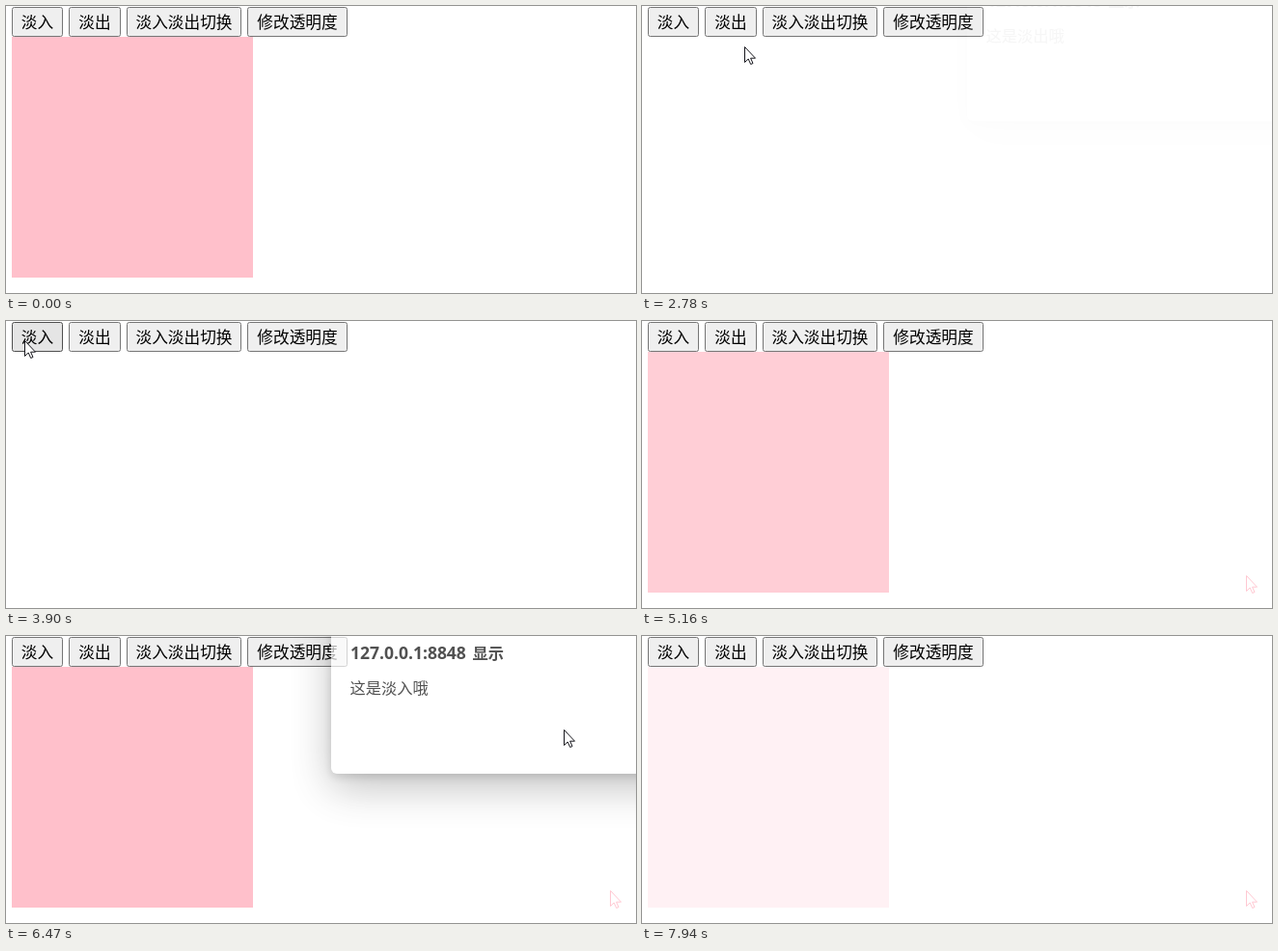
Animation, 653 px wide and 298 px high, one loop 8000 ms. Source, as an HTML page:

```html
<!DOCTYPE html>
<html lang="zh-CN">
<head>
<meta charset="utf-8">
<title>淡入淡出</title>
<style>
  html, body { margin: 0; width: 100%; height: 100%; overflow: hidden; background: #fff; }
  #stage { position: absolute; inset: 0; overflow: hidden; }
  #stage > * { position: absolute; }
  svg { left: 0; top: 0; width: 653px; height: 298px; }
  text { font-family: "Noto Sans CJK SC", "Noto Sans CJK", sans-serif; }
  #box { left: 6px; top: 32px; width: 250px; height: 250px; background: #ffc0cb; }
  .button rect { fill: #efefef; stroke: #767676; }
  .button.hover rect { fill: #e5e5e5; stroke: #4f4f4f; }
  .button text { font-size: 16.67px; font-weight: 300; }
  #dialog {
    left: 337px; top: -20px; width: 440px; height: 163px;
    background: #fff; border-radius: 6px;
    box-shadow: 0 14px 44px rgba(0, 0, 0, .36), 0 3px 10px rgba(0, 0, 0, .22);
  }
  #dialog svg { position: absolute; top: 20px; width: 316px; height: 143px; font-size: 16.25px; }
  #dialog .host { font: 700 17.5px "Open Sans", sans-serif; }
</style>
</head>
<body>
<div id="stage">
  <div id="box"></div>
  <svg>
    <defs>
      <path id="arrow" d="M.5 .5V16.5L4.2 13L6.7 18.5L9 17.5L6.6 12.2H11.5Z"/>
    </defs>
    <g id="buttons"></g>
    <use id="trace" href="#arrow" x="626" y="264" fill="#fff" stroke="#ffc8d2"/>
  </svg>
  <div id="dialog">
    <svg>
      <text class="host" x="20" y="24">127.0.0.1:8848</text>
      <text x="146.5" y="24" font-weight="700">显示</text>
      <text id="message" x="19.5" y="60"></text>
    </svg>
  </div>
  <svg><use id="cursor" href="#arrow" fill="#fff" stroke="#16161c"/></svg>
</div>
<script>
const LOOP = 8000;
const $ = id => document.getElementById(id);
const clamp = v => Math.max(0, Math.min(1, v));
const smooth = p => p * p * (3 - 2 * p);
const swing = p => .5 - Math.cos(Math.PI * clamp(p)) / 2;

// Buttons flow from left to right, each as wide as its label plus padding.
let flow = 6.3;
const buttons = ['淡入', '淡出', '淡入淡出切换', '修改透明度'].map(label => {
  const left = Math.round(flow);
  flow += 20 + 16.67 * label.length;
  const right = Math.round(flow - .2);
  flow += 5.8;
  $('buttons').insertAdjacentHTML('beforeend',
    `<g class="button"><rect x="${left + .5}" y="1.5" width="${right - left - 1}" height="30" rx="2"/>
     <text x="${(left + right) / 2}" y="23" text-anchor="middle">${label}</text></g>`);
  return { left, right, node: $('buttons').lastElementChild };
});

const fadeIn = [19, 20], fadeOut = [83, 23], toggle = [140, 7];
const belowButtons = [106, 42], besideToggle = [115, 12];
const entrance = [470, 300], outside = [660, 112], corner = [660, 278];

const moves = [
  { at: 130, for: 300, to: fadeOut },
  { at: 600, for: 120, to: fadeIn },
  { at: 1000, for: 180, to: fadeOut },
  { at: 2380, for: 320, to: belowButtons },
  { at: 2850, for: 300, to: outside },
  { at: 3640, for: 255, to: fadeIn },
  { at: 4500, for: 400, to: corner },
  { at: 5000, for: 1, to: outside },
  { at: 6410, for: 250, to: besideToggle },
  { at: 6870, for: 260, to: toggle },
  { at: 7215, for: 200, to: outside }
];

// A fade is painted in three coarse steps; its dialog opens when it is done.
const fades = [
  { start: 2190, step: 190, show: false, message: '这是淡出哦', close: 3640 },
  { start: 4600, step: 280, show: true, message: '这是淡入哦', close: 6410 },
  { start: 7400, step: 270, show: false }
];

function pointerAt(t) {
  let [x, y] = entrance;
  for (const move of moves) {
    const p = smooth(clamp((t - move.at) / move.for));
    x += (move.to[0] - x) * p;
    y += (move.to[1] - y) * p;
  }
  return [Math.round(x), Math.round(y)];
}

function drawPointer(t) {
  const [x, y] = pointerAt(t);
  $('cursor').setAttribute('transform', `translate(${x} ${y})`);
  for (const { left, right, node } of buttons)
    node.classList.toggle('hover', x >= left && x < right && y >= 1 && y < 32);
}

function drawBox(t) {
  const fade = fades.filter(f => f.start <= t).pop();
  const hidden = fade ? swing(Math.floor((t - fade.start) / fade.step) / 2.9) : 0;
  $('box').style.opacity = fade && fade.show ? hidden : 1 - hidden;
}

function drawDialog(t) {
  const fade = fades.find(f => t >= f.start + 3 * f.step && t < f.close + 190);
  $('dialog').style.display = fade ? '' : 'none';
  if (!fade) return;
  const shown = smooth(clamp((t - fade.start - 3 * fade.step) / 200));
  const gone = clamp((t - fade.close) / 190);
  $('message').textContent = fade.message;
  $('dialog').style.opacity = shown * (1 - gone);
  $('dialog').style.transform = `translateY(${-24 * (1 - shown)}px)`;
}

function draw(t) {
  $('trace').style.display = t >= 4890 ? '' : 'none';
  drawBox(t);
  drawDialog(t);
  drawPointer(t);
}

const start = performance.now();
function tick() {
  draw((performance.now() - start) % LOOP);
  requestAnimationFrame(tick);
}
tick();
</script>
</body>
</html>
```
